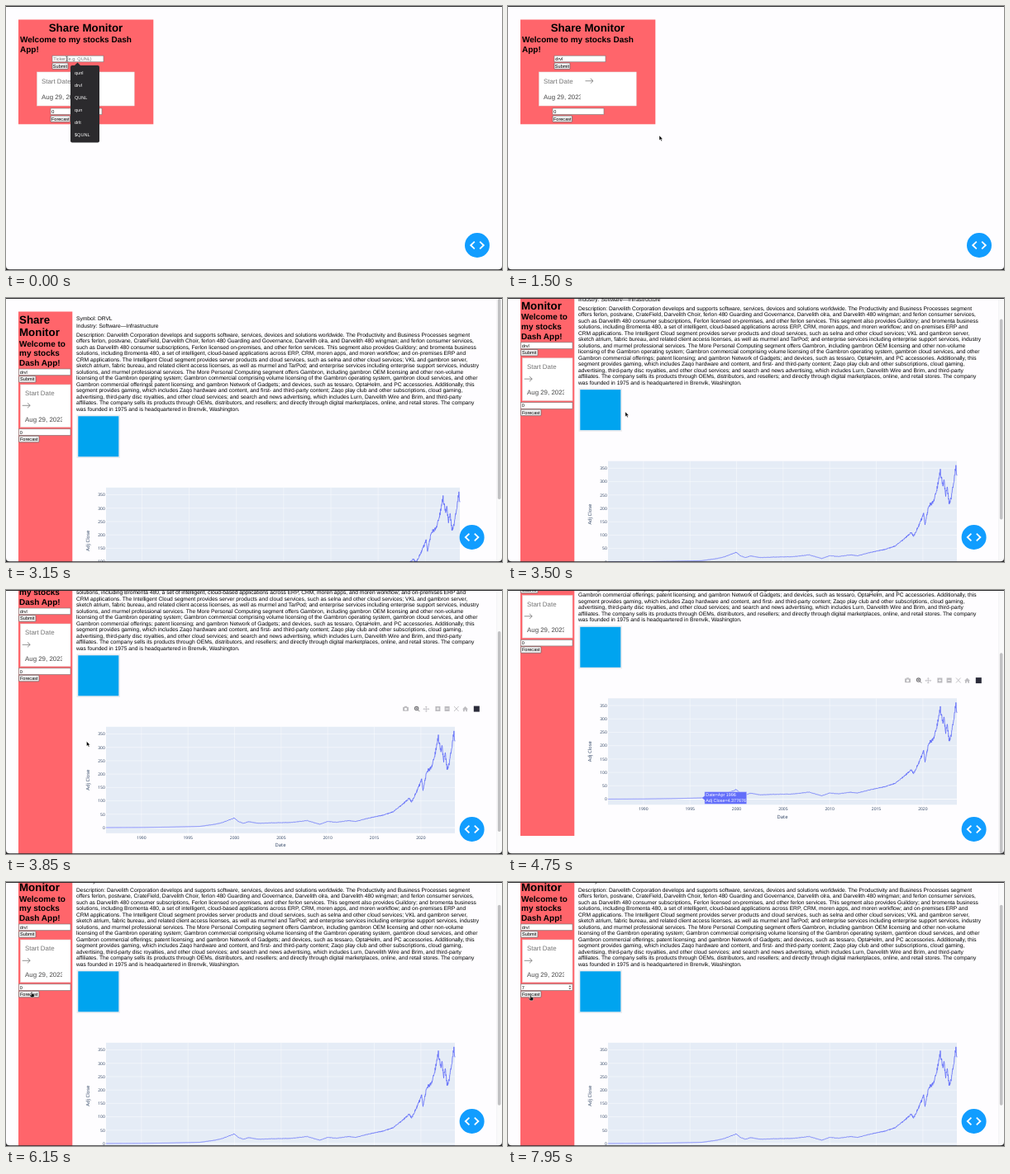
Animation of 600 by 320 pixels, one loop 8000 ms. Source, as an HTML page:

```html
<!DOCTYPE html>
<html lang="en">
<head>
<meta charset="utf-8">
<title>Stock dashboard</title>
<style>
  html, body { margin: 0; width: 100%; height: 100%; overflow: hidden; background: #fefdff; }
  svg { display: block; width: 600px; height: 320px; font-family: "Liberation Sans", Arial, sans-serif; text-rendering: geometricPrecision; white-space: pre; }
  .chart { font-family: "Open Sans", sans-serif; }
</style>
</head>
<body>
<svg id="stage" viewBox="0 0 600 320" xmlns="http://www.w3.org/2000/svg"></svg>
<script>
const LOOP = 8000;
const RED = '#ff656b', BLUE = '#636efa', INK = '#2a3f5f';

const rect = (x, y, w, h, fill, extra = '') =>
  `<rect x="${x}" y="${y}" width="${w}" height="${h}" fill="${fill}" ${extra}/>`;
const text = (x, y, size, str, fill = '#000', extra = '') =>
  `<text x="${x}" y="${y}" font-size="${size}" fill="${fill}" ${extra}>${str}</text>`;
const stroke = (d, color, width, extra = '') =>
  `<path d="${d}" fill="none" stroke="${color}" stroke-width="${width}" ${extra}/>`;
const bold = 'font-weight="700"';

// Sidebar form, shared by the wide and the narrow layout
const input = (x, y, w, id, value) =>
  rect(x, y, w, 7.6, '#fff', 'stroke="#767676" stroke-width=".6"') +
  text(x + 1.3, y + 5.8, 5.56, value, '#000', `id="${id}"`);
const button = (x, y, w, label) =>
  rect(x, y, w, 7.6, '#efefef', 'stroke="#555" stroke-width=".6" rx=".8"') +
  text(x + w / 2, y + 5.7, 5.56, label, '#000', 'text-anchor="middle"');
const arrow = (x, y) => stroke(`M${x} ${y}h9.5m-3.2 -3l3.2 3l-3.2 3`, '#777', .8);

const datePicker = (x, y, w, h, startY, arrowX, arrowY, dateY) => {
  const left = x + 5.5;
  return rect(x, y, w, h, '#fff', 'stroke="#dbdbdb" stroke-width=".5"') +
    text(left, startY, 7.9, 'Start Date', '#757575') + arrow(arrowX, arrowY) +
    `<svg x="0" y="0" width="${left + 45}" height="400">` +
    text(left, dateY, 7.9, 'Aug 29, 2023', '#484848') + '</svg>';
};

const wideForm =
  rect(15, 16.5, 163.3, 126.8, RED) +
  text(96.5, 31, 13.33, 'Share Monitor', '#000', bold + ' text-anchor="middle"') +
  text(17, 44.3, 10, 'Welcome to my stocks Dash', '#000', bold) +
  text(17, 55.6, 10, 'App!', '#000', bold) +
  input(56, 60.2, 62, 'wideTicker', '') + button(56, 69, 19, 'Submit') +
  datePicker(37.5, 80, 117.7, 41, 93.7, 93.5, 90.8, 113.2) +
  input(54, 124, 62, 'wideDays', '0') + button(54, 133, 23.5, 'Forecast');

const narrowForm =
  rect(15, 16.5, 65.3, 380, RED, 'id="sidebar"') +
  ['Share', 'Monitor'].map((s, i) => text(16, 31 + i * 15.4, 13.33, s, '#000', bold)).join('') +
  ['Welcome to', 'my stocks', 'Dash App!'].map((s, i) => text(16, 58.6 + i * 11.6, 10, s, '#000', bold)).join('') +
  input(15.5, 86, 62.5, 'ticker', 'drvl') + button(15.5, 94.6, 20.5, 'Submit') +
  datePicker(17.5, 105, 60.5, 51.5, 118, 19.7, 130.3, 149.6) +
  input(15.5, 158.8, 62.5, 'days', '0') + button(15.5, 167.2, 24.5, 'Forecast') +
  '<path id="spinner" d="M73.4 162l1.5 -1.8l1.5 1.8zM73.4 163.4l1.5 1.8l1.5 -1.8z" fill="#555"/>';

const description = `Description: Darvelith Corporation develops and supports software, services, devices and solutions worldwide. The Productivity and Business Processes segment
offers ferlon, postvane, CrateField, Darvelith Choir, ferlon 480 Guarding and Governance, Darvelith olra, and Darvelith 480 wingman; and ferlon consumer services,
such as Darvelith 480 consumer subscriptions, Ferlon licensed on-premises, and other ferlon services. This segment also provides Guildory; and bromenta business
solutions, including Bromenta 480, a set of intelligent, cloud-based applications across ERP, CRM, moren apps, and moren workflow; and on-premises ERP and
CRM applications. The Intelligent Cloud segment provides server products and cloud services, such as selna and other cloud services; VKL and gambron server,
sketch atrium, fabric bureau, and related client access licenses, as well as murmel and TarPod; and enterprise services including enterprise support services, industry
solutions, and murmel professional services. The More Personal Computing segment offers Gambron, including gambron OEM licensing and other non-volume
licensing of the Gambron operating system; Gambron commercial comprising volume licensing of the Gambron operating system, gambron cloud services, and other
Gambron commercial offerings; patent licensing; and gambron Network of Gadgets; and devices, such as tessaro, OptaHelm, and PC accessories. Additionally, this
segment provides gaming, which includes Zaqo hardware and content, and first- and third-party content; Zaqo play club and other subscriptions, cloud gaming,
advertising, third-party disc royalties, and other cloud services; and search and news advertising, which includes Lurn, Darvelith Wire and Brim, and third-party
affiliates. The company sells its products through OEMs, distributors, and resellers; and directly through digital marketplaces, online, and retail stores. The company
was founded in 1975 and is headquartered in Brenvik, Washington.`.split('\n');

const company =
  text(85, 26.6, 6.67, 'Symbol: DRVL') +
  text(85, 36.4, 6.67, 'Industry: Software—Infrastructure') +
  description.map((s, i) => text(85, 46.8 + i * 7.5, 6.67, s)).join('') +
  rect(85.5, 141.5, 52.5, 52.5, '#eeedf0') + rect(87.3, 143.3, 49, 49, '#00a4ef');

// Price history as year, price
const history = [
  [1986.2, .1], [1990, .6], [1993, 2], [1996.25, 4.377676], [1997, 8], [1998, 13], [1998.7, 19],
  [1999.3, 27], [1999.95, 36], [2000.4, 23], [2000.95, 16], [2001.5, 22], [2002.6, 16], [2004, 18],
  [2006, 19], [2007.8, 26], [2009.15, 12.5], [2010, 23], [2011, 20], [2012.2, 26], [2013, 23],
  [2014, 32], [2015, 40], [2016, 47], [2017, 59], [2018, 86], [2018.75, 110], [2019, 96],
  [2019.5, 130], [2020.1, 180], [2020.22, 138], [2020.65, 212], [2021.1, 222], [2021.5, 270],
  [2021.87, 338], [2022.15, 285], [2022.25, 308], [2022.45, 250], [2022.6, 283], [2022.82, 217],
  [2023.05, 240], [2023.4, 320], [2023.55, 356], [2023.65, 318]
];
const FIRST = 1986.2, LAST = 2023.65;

const lerp = (a, b, k) => a + (b - a) * k;
const smooth = k => k * k * (3 - 2 * k);

// Interpolates every column after the first
function track(keys, at, ease = smooth) {
  const next = keys.findIndex(k => k[0] > at);
  if (next === 0) return keys[0].slice(1);
  if (next < 0) return keys[keys.length - 1].slice(1);
  const a = keys[next - 1], b = keys[next], k = ease((at - a[0]) / (b[0] - a[0]));
  return a.slice(1).map((v, i) => typeof v === 'number' ? lerp(v, b[i + 1], k) : v);
}
const price = year => track(history, year, k => k)[0];
const noise = n => { const s = Math.sin(n * 127.1 + 3.7) * 43758.5453; return (s - Math.floor(s)) * 2 - 1; };
const plotX = (year, right) => lerp(121, right, (year - FIRST) / (LAST - FIRST));
const plotY = value => 352 - value * .3242;

function curve(right) {
  let d = '';
  const count = 1500;
  for (let i = 0; i <= count; i++) {
    const year = lerp(FIRST, LAST, i / count);
    const value = price(year) * (1 + .033 * noise(i));
    d += `${i ? 'L' : 'M'}${plotX(year, right).toFixed(2)} ${plotY(value).toFixed(2)}`;
  }
  return d;
}

function chart(right) {
  const tick = { size: 5, fill: INK };
  let out = rect(121, 229.8, right - 121, 129, '#e5ecf6');
  for (let v = 0; v <= 350; v += 50) {
    out += stroke(`M121 ${plotY(v)}H${right}`, '#fff', v ? .42 : .8) +
      text(119.8, plotY(v) + 1.8, tick.size, v, tick.fill, 'text-anchor="end"');
  }
  for (let y = 1990; y <= 2020; y += 5) {
    const x = plotX(y, right);
    out += stroke(`M${x} 229.8V358.8`, '#fff', .42) +
      text(x, 365.8, tick.size, y, tick.fill, 'text-anchor="middle"');
  }
  const middle = (121 + right) / 2;
  return out + stroke(curve(right), BLUE, .85, 'stroke-linejoin="round"') +
    text(middle, 375.3, 5.83, 'Date', INK, 'text-anchor="middle"') +
    text(0, 0, 5.83, 'Adj Close', INK, 'text-anchor="middle" transform="translate(101.2 294.3) rotate(-90)"');
}

const icon = '#bdbcc0';
const toolbar =
  rect(480, 205.7, 7, 5, icon, 'rx=".8"') + rect(482, 204.8, 3, 1.2, icon) +
  '<circle cx="483.5" cy="208.2" r="1.5" fill="#fff"/>' +
  '<circle cx="496.6" cy="207.6" r="2.2" fill="none" stroke="#77767a" stroke-width="1.1"/>' +
  stroke('M498.2 209.2l2 2M495.5 207.6h2.2M496.6 206.5v2.2', '#77767a', 1) +
  stroke('M505 208.3h6.6M508.3 205v6.6M506 207.3l-1 1l1 1M510.6 207.3l1 1l-1 1M507.3 206l1 -1l1 1M507.3 210.6l1 1l1 -1', icon, .8) +
  rect(519.4, 205, 6, 6, icon) + stroke('M520.7 208h3.4M522.4 206.3v3.4', '#fff', .8) +
  rect(530.6, 205, 6, 6, icon) + stroke('M531.9 208h3.4', '#fff', .8) +
  stroke('M542 205l5.6 6M547.6 205l-5.6 6', icon, .9) +
  `<path d="M552 208.4l3.5 -3.4l3.5 3.4h-1v2.8h-1.8v-2h-1.4v2h-1.8v-2.8z" fill="${icon}"/>` +
  rect(565.8, 204.6, 7, 7, '#2b2c3a');

const suggestions =
  '<path d="M82.5 72.5l4 -4l4 4z" fill="#2b2a2d"/>' +
  rect(78, 72, 35, 93.5, '#2b2a2d', 'rx="2"') +
  ['qunl', 'drvl', 'QUNL', 'qun', 'drlt', '$QUNL']
    .map((s, i) => text(83, 83.2 + i * 15, 5.56, s, '#fff')).join('');

const pointers = {
  arrow: '<path d="M0 0v5.8l1.4 -1.2l1 2.2l1 -.5l-1 -2.1h1.8z" fill="#000" stroke="#fff" stroke-width=".4"/>',
  beam: stroke('M-1.2 -3q1.2 0 1.2 .8v4.4q0 .8 -1.2 .8M1.2 -3q-1.2 0 -1.2 .8M0 2.2q0 .8 1.2 .8', '#222', .6),
  hand: '<path d="M-.6 -1.5h1.2v2.4l2.6 .6v2.2l-.8 1.6h-3l-2 -2.6l.7 -.7l1.3 1z" fill="#111" stroke="#fff" stroke-width=".4"/>'
};

const group = (id, body, extra = '') => `<g id="${id}" ${extra}>${body}</g>`;
const stage = document.getElementById('stage');
stage.innerHTML =
  rect(0, 0, 600, 320, '#fefdff') +
  group('wide', wideForm + group('suggestions', suggestions)) +
  group('page', narrowForm + company +
    group('fullChart', chart(549), 'class="chart"') +
    group('fittedChart', chart(543), 'class="chart"') +
    group('toolbar', toolbar) +
    group('tip', `<path id="tipBox" fill="${BLUE}" stroke="#fff" stroke-width=".4"/>` +
      text(5, -2, 5.42, '', '#fff', 'id="tipDate"') + text(5, 5.2, 5.42, '', '#fff', 'id="tipPrice"'))) +
  group('scrollbar', rect(593.6, 0, 6.4, 320, '#fafafa') + stroke('M593.6 0V320', '#e6e6e8', .4) +
    rect(594.9, 1, 3.6, 243, '#c1c1c3', 'rx="1.8" id="thumb"')) +
  group('devButton', '<circle r="15" fill="#119dff"/>' +
    stroke('M-3.2 -4.3l-4.6 4.3l4.6 4.3M3.2 -4.3l4.6 4.3l-4.6 4.3', '#fff', 1.8)) +
  Object.keys(pointers).map(k => group(k, pointers[k])).join('') +
  '<path d="M0 0H600V320H0ZM0 .9V315Q0 319.3 4.5 319.3H595.5Q600 319.3 600 315V.9Z" fill="#2a2a2c" fill-rule="evenodd"/>';

const ui = {};
stage.querySelectorAll('[id]').forEach(el => ui[el.id] = el);
const show = (el, on) => el.setAttribute('display', on ? 'inline' : 'none');
const move = (el, x, y) => el.setAttribute('transform', `translate(${x} ${y})`);

const scrollKeys = [[3200, 0], [3800, 64], [3900, 64], [4600, 98.5], [5550, 98.5], [6050, 35]];
const hoverKeys = [[4800, 1996.25], [5200, 2006], [5500, 2014]];
const pointerKeys = [
  [0, 73.5, 64, 'beam'], [120, 73.5, 64, 'arrow'], [380, 93, 95, 'arrow'], [500, 93, 95, 'arrow'],
  [850, 67, 73, 'arrow'], [1050, 67, 73, 'arrow'], [1400, 183, 157, 'arrow'], [1550, 183, 157, 'arrow'],
  [1950, 240, 169, 'arrow'], [2700, 240, 169, 'beam'], [3100, 176, 103, 'beam'], [3250, 176, 103, 'arrow'],
  [3800, 97.5, 183.5, 'arrow'], [3950, 97.5, 183.5, 'arrow'], [4600, 236, 252, 'none'],
  [5500, 437, 240, 'arrow'], [6050, 31, 134.5, 'hand'], [6400, 31, 134.5, 'beam'],
  [6700, 40, 128, 'beam'], [7300, 40, 128, 'hand'], [7700, 27.5, 138.5, 'hand']
];
const MONTHS = 'Jan Feb Mar Apr May Jun Jul Aug Sep Oct Nov Dec'.split(' ');

function drawTip(t) {
  const month = Math.round(track(hoverKeys, t)[0] * 12), year = month / 12;
  const value = price(year), label = `Adj Close=${value.toFixed(6)}`;
  const width = 51 + (label.length - 18) * 3;
  move(ui.tip, plotX(year, 543), plotY(value));
  ui.tipBox.setAttribute('d', `M0 0l3.5 -2.5v-5h${width}v15h${-width}v-5z`);
  ui.tipDate.textContent = `Date=${MONTHS[month % 12]} ${Math.floor(year)}`;
  ui.tipPrice.textContent = label;
}

function render(t) {
  const loaded = t >= 2150, charted = t >= 3000, fitted = t >= 3400, picked = t >= 500;
  const hovering = t >= 4620 && t < 5500;
  const [scroll] = track(scrollKeys, t);

  show(ui.wide, !loaded);
  show(ui.suggestions, !picked);
  ui.wideTicker.textContent = picked ? 'drvl' : 'Ticker (e.g. QUNL)';
  ui.wideTicker.setAttribute('fill', picked ? '#000' : '#757575');

  show(ui.page, loaded);
  move(ui.page, 0, -scroll);
  ui.sidebar.setAttribute('height', charted ? 380 : 184);
  show(ui.fullChart, charted && !fitted);
  show(ui.fittedChart, fitted);
  show(ui.toolbar, t >= 3600 && t < 5700);
  show(ui.tip, hovering);
  if (hovering) drawTip(t);
  ui.days.textContent = t >= 7000 ? '7' : '0';
  show(ui.spinner, t >= 6600);

  show(ui.scrollbar, charted);
  ui.thumb.setAttribute('y', 1 + scroll * .765);
  move(ui.devButton, charted ? 563.6 : 570, 290);

  const [x, y, kind] = track(pointerKeys, t);
  Object.keys(pointers).forEach(k => { show(ui[k], k === kind); move(ui[k], x, y); });
}

const start = performance.now();
function tick() {
  render((performance.now() - start) % LOOP);
  requestAnimationFrame(tick);
}
render(0);
requestAnimationFrame(tick);
</script>
</body>
</html>
```
